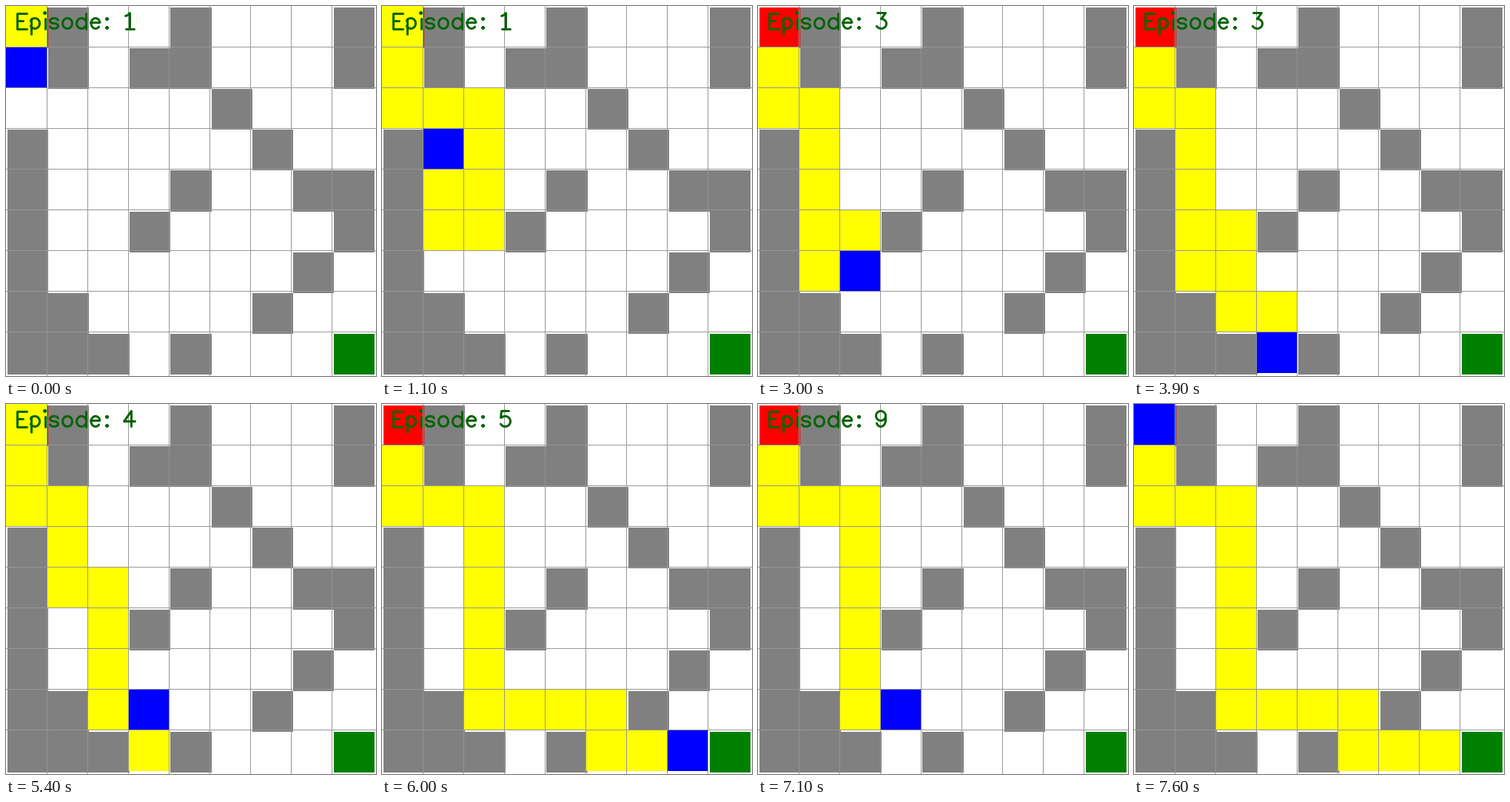
Animation of 500 by 500 pixels, one loop 7.7 s. Source, as a matplotlib script:

```python
import math

import matplotlib.pyplot as plt
from matplotlib.animation import FuncAnimation
from matplotlib.collections import LineCollection
from matplotlib.patches import Rectangle

SIZE, N = 500, 9
STEP = 496 / N
GRAY, LINE, INK = "#808080", "#969696", "#006400"
WALLS = ["01", "04", "08", "11", "13", "14", "18", "25", "30", "36", "40",
         "44", "47", "48", "50", "53", "58", "60", "67", "70", "71", "76",
         "80", "81", "82", "84"]

# One word per picture: U/D/L/R are moves, "-" is a bump into a wall.
BEST = "DDRRD DDDDR RRDRR"
EPISODES = [
    "-D U - - D D RR D DL DR - LUU DDDR R - DR RDR R",
    "DDRR LD DR DD DR - RR DRR UR -",
    "DDRDD DD URD U DD - RD U D - U D" + " -" * 8,
    "-DDR DDRD DD R D - U - RRDR RUR",
] + [BEST] * 6
MOVES = {"U": (-1, 0), "D": (1, 0), "L": (0, -1), "R": (0, 1), "-": (0, 0)}


def arc(cx, cy, rx, ry, a, b, n=28):
    angles = [math.radians(a + (b - a) * k / n) for k in range(n + 1)]
    return [(cx + rx * math.cos(t), cy + ry * math.sin(t)) for t in angles]


# Single-stroke glyphs: (advance, strokes), y up from the baseline.
LETTERS = {
    "E": (19, [[(17, 21), (4, 21), (4, 0), (17, 0)], [(4, 11), (12, 11)]]),
    "p": (19, [[(4, 14), (4, -7)], arc(9.5, 7, 6.5, 7, 150, -150)]),
    "i": (8, [[(4, 14), (4, 0)], arc(4, 21, 1, 1, 0, 360)]),
    "s": (17, [arc(8.5, 10.5, 5.5, 3.5, 10, 270)
               + arc(8.5, 3.5, 5.5, 3.5, 90, -170)]),
    "o": (19, [arc(9.5, 7, 6.5, 7, 0, 360)]),
    "d": (19, [[(15, 21), (15, 0)], arc(9.5, 7, 6.5, 7, 30, 330)]),
    "e": (18, [[(3, 8), (15, 8)] + arc(9.5, 7, 6, 7, 10, 320)]),
    ":": (11, [arc(7, 13, 1, 1, 0, 360), arc(7, 1, 1, 1, 0, 360)]),
    " ": (16, []),
}
DIGITS = [
    [arc(10, 10.5, 7, 10.5, 0, 360)],
    [[(5, 17), (8, 18), (11, 21), (11, 0)], [(5, 0), (16, 0)]],
    [arc(10, 15.5, 6, 5.5, 175, -30) + [(4, 0), (17, 0)]],
    [[(5, 21), (16, 21), (10, 13)] + arc(10, 6.5, 7, 6.5, 90, -150)],
    [[(13, 0), (13, 21), (3, 7), (18, 7)]],
    [[(15, 21), (5, 21), (4, 12)] + arc(10, 7, 7, 7, 130, -150)],
    [arc(10.5, 12, 6.5, 9, 30, 180) + arc(10.5, 6.5, 6.5, 6.5, 180, 540)],
    [[(3, 21), (17, 21), (7, 0)]],
    [arc(10, 16.5, 6, 4.5, 0, 360), arc(10, 6, 7, 6, 0, 360)],
    [arc(9.5, 14.5, 6.5, 6.5, 0, 360) + arc(9.5, 9, 6.5, 9, 0, -150)],
]


def strokes(text, x=10, y=30):
    out = []
    for ch in text:
        advance, glyph = (20, DIGITS[int(ch)]) if ch.isdigit() else LETTERS[ch]
        out += [[(x + px + 0.5, y - py + 0.5) for px, py in line]
                for line in glyph]
        x += advance
    return out


def simulate():
    shots = []
    for number, script in enumerate(EPISODES, 1):
        pos, trail = (0, 0), set()
        for word in script.split():
            for key in word:
                pos = (pos[0] + MOVES[key][0], pos[1] + MOVES[key][1])
                trail.add(pos)
            shots.append((pos, frozenset(trail), f"Episode: {number}"))
    shots.append(((0, 0), frozenset(trail), ""))
    return shots


SHOTS = simulate()

fig = plt.figure(figsize=(5, 5), dpi=100, facecolor="white")
ax = fig.add_axes([0, 0, 1, 1])
ax.set_xlim(0, SIZE)
ax.set_ylim(SIZE, 0)
ax.axis("off")


def box(x0, y0, x1, y1, color, z):
    return ax.add_patch(Rectangle((x0, y0), x1 - x0, y1 - y0, fc=color,
                                  lw=0, antialiased=False, zorder=z))


def tile(row, col, color):
    edge = [round(2 + STEP * k) for k in range(N + 1)]
    box(edge[col], edge[row], edge[col + 1], edge[row + 1], color, 1)


def span(k):
    return math.ceil(STEP * k), 496 if k == N - 1 else int(STEP * (k + 1))


for wall in WALLS:
    tile(int(wall[0]), int(wall[1]), GRAY)
tile(0, 0, "#ff0000")
tile(8, 8, "#008000")

cells = {}
for r in range(N):
    for c in range(N):
        (x0, x1), (y0, y1) = span(c), span(r)
        cells[r, c] = box(x0, y0, x1, y1, "#ffff00", 2)

for k in range(1, N):
    p = int(STEP * k)
    box(p, 0, p + 1, SIZE, LINE, 3)
    box(0, p, SIZE, p + 1, LINE, 3)

label = LineCollection([], colors=INK, linewidths=3 * 0.72,
                       capstyle="round", joinstyle="round", zorder=4)
ax.add_collection(label, autolim=False)


def draw(i):
    pos, trail, text = SHOTS[i]
    for key, cell in cells.items():
        cell.set_visible(key == pos or key in trail)
        cell.set_facecolor("#0000ff" if key == pos else "#ffff00")
    label.set_segments(strokes(text))
    return [*cells.values(), label]


anim = FuncAnimation(fig, draw, frames=len(SHOTS), interval=100,
                     repeat=True, repeat_delay=0, blit=False)
plt.show()
```
